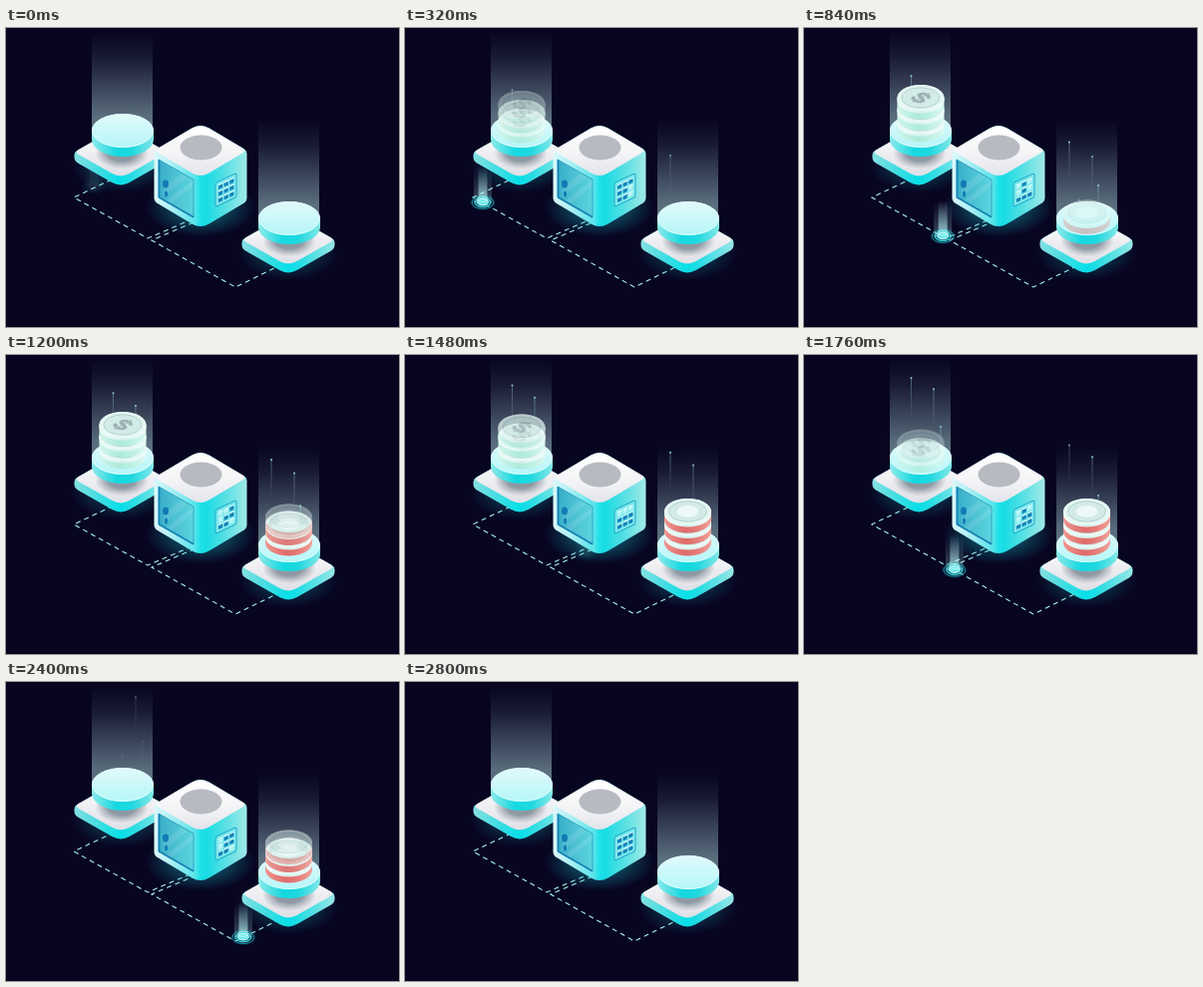
An HTML page that plays this animation: 394 px wide and 300 px high, repeating every 2840 ms.

```html
<!DOCTYPE html>
<html lang="en">
<head>
<meta charset="utf-8">
<title>Coin exchange</title>
<style>
html, body { margin: 0; width: 100%; height: 100%; overflow: hidden; background: #080521; }
svg { display: block; width: 100vw; height: 100vh; }
text { font: 800 24px Inter, Arial, sans-serif; text-anchor: middle; }
</style>
</head>
<body>
<svg id="stage" viewBox="0 0 394 300"></svg>
<script>
const LOOP = 2840, STEP = 40;
const clamp = v => Math.max(0, Math.min(1, v));
const ramp = (t, from, len) => clamp((t - from) / len);
const span = (t, from, to, rise, fall = rise) => Math.min(ramp(t, from, rise), 1 - ramp(t, to - fall, fall));

// Gradient; each stop is "offset colour opacity"
function grad(id, vertical, ...stops) {
  const body = stops.map(s => {
    const [o, c, a = 1] = s.split(' ');
    return `<stop offset="${o}" stop-color="${c}" stop-opacity="${a}"/>`;
  }).join('');
  return `<linearGradient id="${id}" x2="${vertical ? 0 : 1}" y2="${vertical ? 1 : 0}">${body}</linearGradient>`;
}

// Polygon with softened corners, one radius per point
function rounded(pts, radii) {
  const n = pts.length;
  const toward = (a, b, r) => {
    const len = Math.hypot(b[0] - a[0], b[1] - a[1]);
    const k = Math.min(r, len / 2) / len;
    return [a[0] + (b[0] - a[0]) * k, a[1] + (b[1] - a[1]) * k];
  };
  return pts.map((p, i) =>
    `${i ? 'L' : 'M'}${toward(p, pts[(i + n - 1) % n], radii[i])}Q${p} ${toward(p, pts[(i + 1) % n], radii[i])}`).join('') + 'Z';
}

function block(x, y, hw, hh, h, side, top) {
  const hull = [[x - hw, y], [x, y - hh], [x + hw, y], [x + hw, y + h], [x, y + hh + h], [x - hw, y + h]];
  const lid = [[x - hw, y], [x, y - hh], [x + hw, y], [x, y + hh]];
  return `<path d="${rounded(hull, [3, 10, 3, 4, 10, 4])}" fill="url(#${side})"/>
    <path d="${rounded(lid, [5, 10, 5, 10])}" fill="url(#${top})"/>`;
}

function drum(x, y, rx, ry, h, side, top) {
  return `<path d="M${x - rx} ${y}v${h}a${rx} ${ry} 0 0 0 ${2 * rx} 0v${-h}z" fill="${side}"/>
    <ellipse cx="${x}" cy="${y}" rx="${rx}" ry="${ry}" fill="${top}"/>`;
}

const oval = (x, y, rx, ry, attrs) => `<ellipse cx="${x}" cy="${y}" rx="${rx}" ry="${ry}" ${attrs}/>`;

function coin(side, emblem) {
  return drum(0, 0, 23.5, 13, 8.5, side, 'none') +
    drum(0, 0, 23.5, 13, 2.5, 'url(#edge)', '#e2f6f2') +
    oval(0, 0, 23, 12.5, 'fill="none" stroke="#f1fdfa" stroke-width=".8"') +
    oval(0, 0, 19, 10.2, 'fill="#d2ebe7" stroke="#aecaca" stroke-width=".8"') + emblem;
}

const dollar = '<text transform="matrix(.78 .42 -.78 .42 0 0)" y="8.500" fill="#9eb2b5">$</text>';
const token = oval(0, 0, 11, 6, 'fill="#edf8f7"');

const piles = [
  { x: 117, y: 70, side: 'url(#mint)', emblem: dollar, enter: [0, 100, 200], leave: [1650, 1550, 1400] },
  { x: 283.5, y: 157, side: 'url(#red)', emblem: token, enter: [700, 880, 1060], leave: [2490, 2370, 2250] }
];

// x, height at time zero, speed, first and last moment
const sparks = [
  [107.5, 71, .0273, 160, 2340], [130, 86.6, .0297, 900, 2680],
  [137, 105.4, .019, 1500, 2500], [116.5, 121.6, .02, 1900, 2500],
  [266, 136.5, .0262, 160, 2220], [289, 153.4, .029, 640, 2400],
  [295, 173.5, .0185, 600, 2300], [275.5, 189, .02, 740, 1400]
];

const routes = [
  { pts: [[88, 159], [68, 169.5], [142, 210.5], [184, 193]],
    keys: [[0, 0], [320, 34], [840, 104], [1180, 153]], on: [-60, 1160, 160] },
  { pts: [[188, 195], [146, 213], [230, 260], [273, 239]],
    keys: [[1430, 0], [2640, 188]], on: [1430, 2640, 140] }
];

const line = pts => 'M' + pts.map(p => p.join(' ')).join('L');

const stand = (x, y) => `
  ${oval(x, y + 13, 50, 28, 'fill="url(#halo)" opacity=".4"')}
  ${block(x, y, 46.5, 26.5, 9, 'base', 'plate')}
  ${oval(x + 1, y + 1, 27, 16, 'fill="url(#shade)"')}`;

const disc = (x, y) => drum(x, y, 31, 17, 9, 'url(#rim)', 'url(#face)') +
  oval(x, y, 30.5, 16.5, 'fill="none" stroke="#e9ffff" stroke-width=".7"');

const beam = (x, y) => `<rect x="${x}" y="${y}" width="61" height="99" fill="url(#beam)"/>`;

const keypad = () => {
  let out = '<rect width="21" height="24" rx="2" fill="#7ce9ec" stroke="#1ba3c4" stroke-width=".9"/>';
  for (let i = 0; i < 9; i++) {
    const x = 3 + i % 3 * 5.6, y = 3.2 + Math.floor(i / 3) * 6.5;
    out += `<rect x="${x}" y="${y}" width="4.4" height="1.6" fill="#eaffff"/>
      <rect class="key" x="${x}" y="${y + 1}" width="4.2" height="3.8" rx=".6"/>`;
  }
  return `<g transform="matrix(1 -.47 0 1 210 155.5)">${out}</g>`;
};

const safe = `
  ${oval(195, 180, 55, 30, 'fill="url(#halo)" opacity=".6"')}
  ${block(195, 123, 46.5, 27.5, 51, 'walls', 'lid')}
  ${oval(195.5, 120, 21, 12.5, 'fill="#b7bac1"')}
  <path d="M153 132L188 152V190L153 170Z" fill="url(#door)" stroke="#2a9fc0" stroke-width=".9"/>
  <path d="M158 159L176 146L182 149.500L158 169Z M160 173L188 153V158L166 176Z" fill="#fff" opacity=".1"/>
  <path d="M153.600 132.500V170L188 189.800" fill="none" stroke="#1682b4" stroke-width="1.600"/>
  ${oval(160, 156.5, 3, 4, 'fill="#1279b4"')}
  ${oval(160.5, 166.5, 1.5, 3, 'fill="#1279b4"')}
  ${keypad()}`;

const pulse = `<g class="pulse">
  ${oval(0, 0, 14, 8.5, 'fill="url(#ripple)"')}
  <rect x="-9" y="-35" width="18" height="35" fill="url(#ray)" opacity=".3"/>
  <rect x="-4.500" y="-36" width="9" height="36" fill="url(#ray)" opacity=".8"/>
  ${oval(0, 0, 11, 6.5, 'fill="none" stroke="#1fa9b5" stroke-width=".8"')}
  ${oval(0, 0, 8, 4.7, 'fill="#1cc6d0" fill-opacity=".4" stroke="#4fe6e8" stroke-width="1"')}
  ${oval(0, -.5, 5.5, 3.2, 'fill="#6fe9ea" stroke="#eaffff" stroke-width=".9"')}
  ${oval(0, -3.5, 5, 2.6, 'fill="none" stroke="#c8ffff" stroke-width=".8"')}
</g>`;

const stage = document.getElementById('stage');
stage.innerHTML = `<defs>
  ${grad('beam', 1, '0 #8fb0b8 0', '.25 #8fb0b8 .12', '.85 #90b2ba .6', '1 #90b2ba .64')}
  ${grad('base', 0, '0 #86e0e2', '.25 #45dde2', '.5 #06dfe8', '.6 #1fdce4', '1 #9ae6e6')}
  ${grad('plate', 1, '0 #ffffff', '.6 #ececf0', '1 #dfe0e6')}
  ${grad('rim', 0, '0 #8eeaea', '.4 #14d8e0', '.65 #1fd8df', '1 #86e8e8')}
  ${grad('face', 1, '0 #e0fafb', '1 #b6f6f8')}
  ${grad('walls', 0, '0 #dcf8fb', '.2 #a8eff3', '.44 #58e4ea', '.5 #1fe0e8', '.56 #18dce4', '.75 #52dfe3', '1 #a2e9e8')}
  ${grad('lid', 1, '0 #ffffff', '.6 #f3f3f6', '1 #e2e4ea')}
  ${grad('door', 0, '0 #38adc8', '.5 #4cc2d3', '1 #5cd5de')}
  ${grad('mint', 0, '0 #d2f6ec', '.45 #acead9', '.7 #bdf0e2', '1 #def9f2')}
  ${grad('red', 0, '0 #f09590', '.45 #df6a69', '.7 #e57c79', '1 #f0a39d')}
  ${grad('edge', 0, '0 #f2fffc', '.5 #d6f0ea', '1 #f2fffc')}
  ${grad('ray', 1, '0 #bff 0', '1 #bff .9')}
  ${grad('tail', 1, '0 #8fc4d0 .6', '1 #8fc4d0 0')}
  <radialGradient id="halo"><stop offset=".5" stop-color="#16c3d0" stop-opacity=".5"/><stop offset="1" stop-color="#16c3d0" stop-opacity="0"/></radialGradient>
  <radialGradient id="shade"><stop offset=".5" stop-color="#7f8a96" stop-opacity=".85"/><stop offset="1" stop-color="#8a94a0" stop-opacity="0"/></radialGradient>
  <radialGradient id="ripple"><stop offset=".3" stop-color="#18b6c4" stop-opacity=".6"/><stop offset="1" stop-color="#0c6f88" stop-opacity="0"/></radialGradient>
</defs>
<rect width="394" height="300" fill="#080521"/>
<g id="dashes" fill="none" stroke="#a5f1ee" stroke-width="1.100" stroke-dasharray="5 4">
  <path d="${line([[106, 152], [68, 170], [142, 211], [184, 193]])}"/>
  <path d="${line(routes[1].pts)}"/>
</g>
${pulse}${pulse}
${stand(115, 124.5)}${stand(283, 212.5)}
${beam(86, 4)}${beam(253, 92)}
${sparks.map(() => '<g class="spark"><circle r="1" fill="#8cc9d3"/><rect x="-.4" width=".8" height="40" fill="url(#tail)"/></g>').join('')}
${disc(117, 103)}${disc(284, 191)}
${piles.map(p => `<g class="coin">${coin(p.side, p.emblem)}</g>`.repeat(3)).join('')}
${safe}`;

const all = name => [...stage.querySelectorAll('.' + name)];
const pulses = all('pulse'), dots = all('spark'), coins = all('coin'), keys = all('key');
const dashes = document.getElementById('dashes');

function place(el, x, y, alpha) {
  el.setAttribute('transform', `translate(${x.toFixed(2)} ${y.toFixed(2)})`);
  el.setAttribute('opacity', alpha.toFixed(3));
}

function distance(keys, t) {
  for (let i = 1; i < keys.length; i++) {
    const [a, from] = keys[i - 1], [b, to] = keys[i];
    if (t <= b) return from + (to - from) * ramp(t, a, b - a);
  }
  return keys[keys.length - 1][1];
}

function along(pts, d) {
  for (let i = 1; i < pts.length; i++) {
    const [ax, ay] = pts[i - 1], [bx, by] = pts[i];
    const len = Math.hypot(bx - ax, by - ay);
    if (d <= len) return [ax + (bx - ax) * d / len, ay + (by - ay) * d / len];
    d -= len;
  }
  return pts[pts.length - 1];
}

const noise = n => { const s = Math.sin(n * 12.9898) * 43758.5453; return s - Math.floor(s); };

function draw(t) {
  dashes.setAttribute('stroke-dashoffset', -18 * t / LOOP);

  routes.forEach((r, i) => {
    const [x, y] = along(r.pts, distance(r.keys, t));
    const [from, to, fade] = r.on;
    place(pulses[i], x, y, span(t, from, to, fade) ** 2);
  });

  sparks.forEach(([x, y, speed, from, to], i) =>
    place(dots[i], x, y - speed * t, span(t, from, to, 240, 600)));

  piles.forEach((p, k) => {
    for (let i = 0; i < 3; i++) {
      const shown = Math.min(ramp(t, p.enter[i], 360), 1 - ramp(t, p.leave[i], 300));
      place(coins[k * 3 + i], p.x, p.y + (2 - i) * 11.5 + 9 * (1 - shown), shown);
    }
  });

  const beat = Math.floor(t / 160);
  keys.forEach((key, i) => {
    const lit = t > 120 && t < 2640 && noise(i + 1 + beat * 9) < .3;
    key.setAttribute('fill', lit ? '#b4f4f4' : '#1683b8');
  });
}

function tick() {
  draw(Math.floor(performance.now() % LOOP / STEP) * STEP);
  requestAnimationFrame(tick);
}
tick();
</script>
</body>
</html>
```
